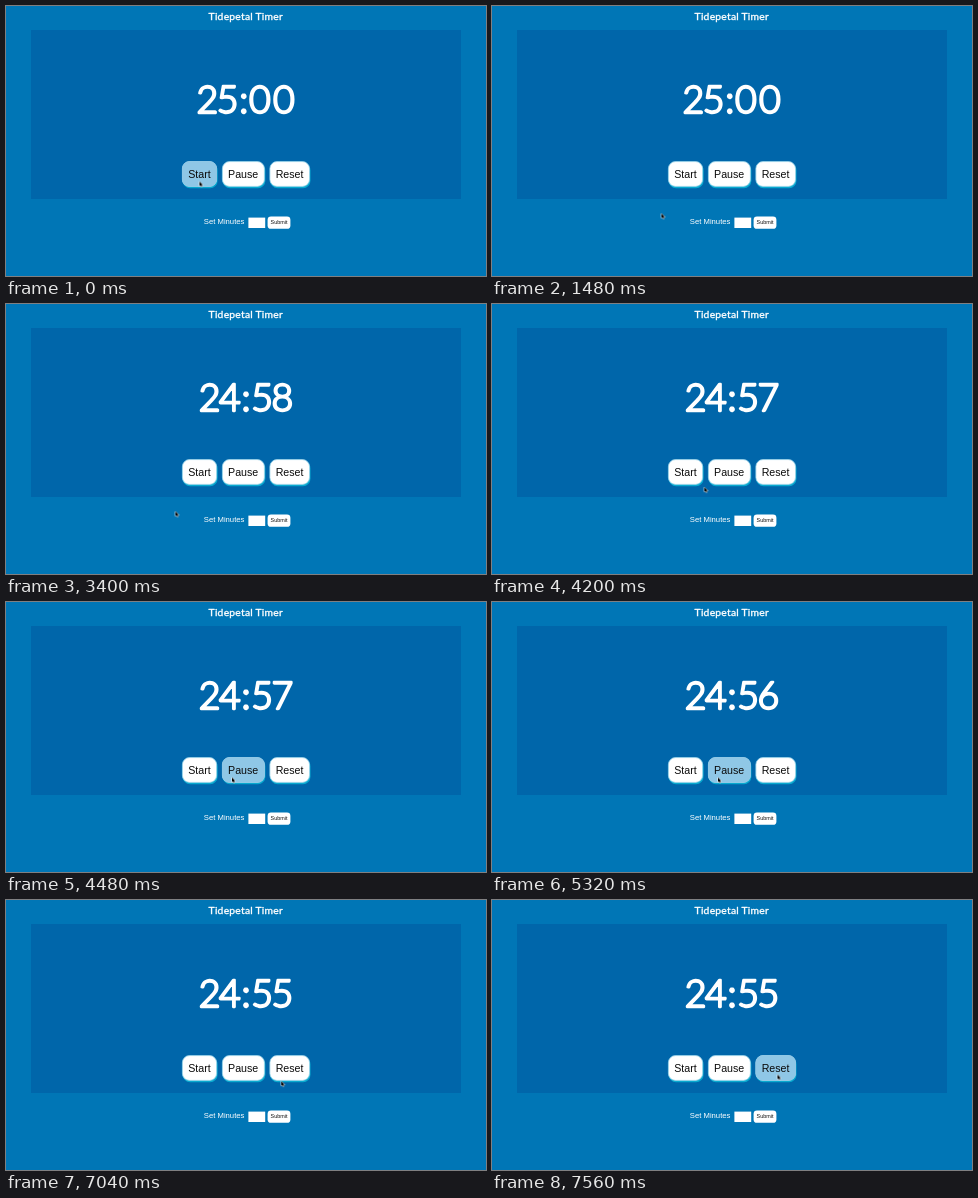
Recreate the animation shown at these times as an HTML page. Size 480 px wide and 270 px high, loop 8000 ms.

```html
<!DOCTYPE html>
<html lang="en">
<head>
<meta charset="utf-8">
<title>Tidepetal Timer</title>
<style>
  html, body { margin: 0; width: 100%; height: 100%; overflow: hidden; background: #0076b6; }
  svg.stage { display: block; width: 100vw; height: 100vh; }
  text { fill: #fff; font-family: "Liberation Sans", Arial, sans-serif; }
  .title {
    font: 400 10.3px Lato, sans-serif;
    letter-spacing: .25px;
    text-anchor: middle;
    stroke: #fff;
    stroke-width: .35px;
    stroke-linejoin: round;
  }

  .digits text {
    font: 300 37.5px Lato, sans-serif;
    letter-spacing: -1.6px;
    text-anchor: middle;
    stroke: #fff;
    stroke-width: 2.3px;
    stroke-linejoin: round;
  }
  .digits .gap { letter-spacing: .8px; }
  .digits .zeros { letter-spacing: 2.2px; }
  .digits { animation: tick 8s step-end infinite; }

  .button text { fill: #0b0b0b; font-size: 10.67px; text-anchor: middle; }
  .shadow { fill: #08a9cf; }
  .face { fill: #fff; stroke: #9bd5ea; stroke-width: .8px; }
  .hover { fill: #8fc7e6; opacity: 0; animation: 8s step-end infinite; }
  .start .hover { animation-name: hover-start; }
  .pause .hover { animation-name: hover-pause; }
  .reset .hover { animation-name: hover-reset; }

  .label { font-size: 7.7px; }
  .small { font-size: 5.4px; fill: #111; text-anchor: middle; }

  .cursor {
    fill: #000; stroke: #fff; stroke-width: .9px; paint-order: stroke;
    animation: travel 8s linear infinite;
  }

  @keyframes tick {
    0% { transform: translateY(0); }
    22.5% { transform: translateY(-60px); }
    34.5% { transform: translateY(-120px); }
    46.5% { transform: translateY(-180px); }
    58.5% { transform: translateY(-240px); }
    70.5%, 100% { transform: translateY(-300px); }
  }
  @keyframes hover-start { 0% { opacity: 1; } 14%, 100% { opacity: 0; } }
  @keyframes hover-pause { 0% { opacity: 0; } 53.5% { opacity: 1; } 84.5%, 100% { opacity: 0; } }
  @keyframes hover-reset { 0% { opacity: 0; } 88.5%, 100% { opacity: 1; } }
  @keyframes travel {
    0% { transform: translate(193.5px, 175.5px); }
    13% { transform: translate(193.5px, 175.5px); animation-timing-function: cubic-bezier(.25, .6, .45, 1); }
    18.5% { transform: translate(169.5px, 207.5px); }
    50% { transform: translate(169.5px, 207.5px); animation-timing-function: cubic-bezier(.25, .6, .45, 1); }
    56% { transform: translate(226px, 175.5px); }
    83.5% { transform: translate(226px, 175.5px); }
    85.75% { transform: translate(243px, 185.5px); }
    88% { transform: translate(275.2px, 181.2px); animation-timing-function: ease-out; }
    91% { transform: translate(285.5px, 173.8px); }
    93.99% { transform: translate(285.5px, 173.8px); }
    94%, 100% { transform: translate(285.5px, 174.6px); }
  }
</style>
</head>
<body>
<svg class="stage" viewBox="0 0 480 270">
  <rect width="480" height="270" fill="#0076b6"/>
  <rect x="25" y="24" width="430" height="169" fill="#0066aa"/>
  <text class="title" x="239.8" y="14.2">Tidepetal Timer</text>

  <svg x="140" y="64" width="200" height="60">
    <g class="digits">
      <text x="100.8" y="43">2<tspan class="gap">5:</tspan><tspan class="zeros">00</tspan></text>
      <text x="99.2" y="103">2<tspan class="gap">4:</tspan>59</text>
      <text x="99.2" y="163">2<tspan class="gap">4:</tspan>58</text>
      <text x="99.2" y="223">2<tspan class="gap">4:</tspan>57</text>
      <text x="99.2" y="283">2<tspan class="gap">4:</tspan>56</text>
      <text x="99.2" y="343">2<tspan class="gap">4:</tspan>55</text>
    </g>
  </svg>

  <g class="button start">
    <rect class="shadow" x="176.6" y="157" width="35" height="25.2" rx="7.5"/>
    <rect class="face" x="176.4" y="155.6" width="34.2" height="24.8" rx="7"/>
    <rect class="hover" x="176" y="155.2" width="35" height="25.6" rx="7.5"/>
    <text x="193.4" y="171.8">Start</text>
  </g>
  <g class="button pause">
    <rect class="shadow" x="216.6" y="157" width="42.8" height="25.2" rx="7.5"/>
    <rect class="face" x="216.4" y="155.6" width="42" height="24.8" rx="7"/>
    <rect class="hover" x="216" y="155.2" width="42.8" height="25.6" rx="7.5"/>
    <text x="237.2" y="171.8">Pause</text>
  </g>
  <g class="button reset">
    <rect class="shadow" x="264.1" y="157" width="40.4" height="25.2" rx="7.5"/>
    <rect class="face" x="263.9" y="155.6" width="39.6" height="24.8" rx="7"/>
    <rect class="hover" x="263.5" y="155.2" width="40.4" height="25.6" rx="7.5"/>
    <text x="283.6" y="171.8">Reset</text>
  </g>

  <text class="label" x="197.8" y="218.4">Set Minutes</text>
  <rect x="242.4" y="211.6" width="16.8" height="10.4" fill="#fff"/>
  <rect x="261.6" y="210.4" width="22.8" height="12.4" rx="3.4" fill="#fff"/>
  <text class="small" x="273" y="218.4">Submit</text>

  <path class="cursor" d="M0 0V4.6L1.1 3.7L1.8 5.3L2.7 4.9L2 3.4H3.4Z"/>
</svg>
</body>
</html>
```
